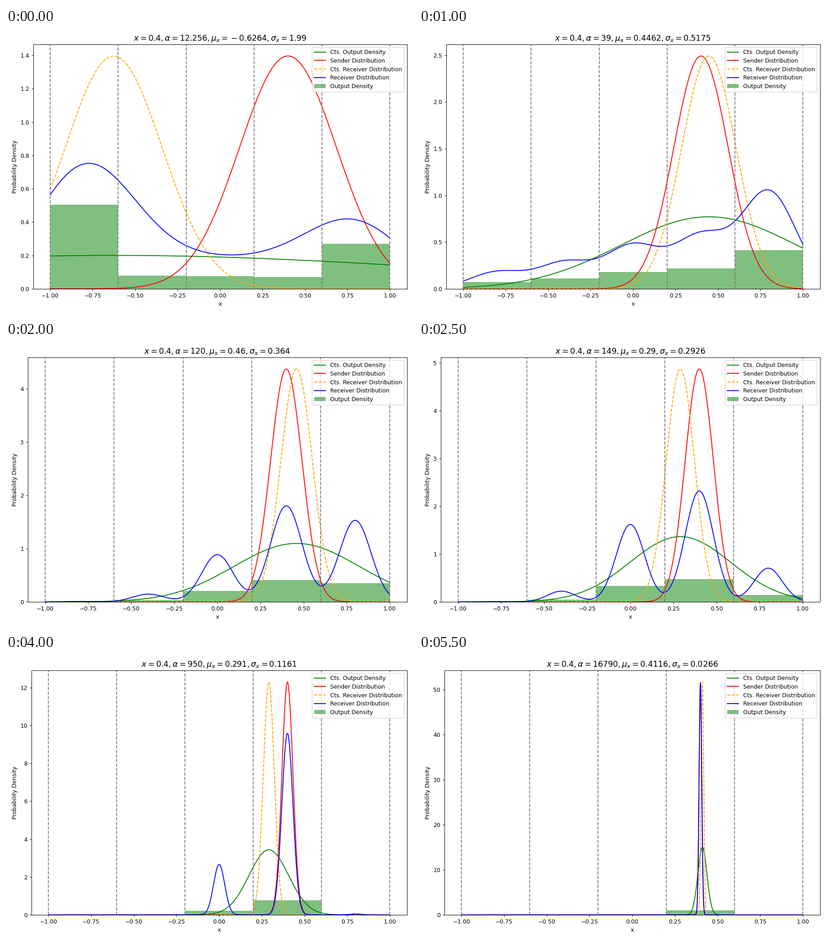
Recreate the animation shown at these times as a matplotlib script. Size 894 by 626 pixels, loop 6 s.

```python
import math

import matplotlib.pyplot as plt
import numpy as np
from matplotlib.animation import FuncAnimation

DPI = 89.4
FRAMES = 12
X_TRUE = 0.4
WIDEST, SHRINK = 1.99, 0.6
EDGES = np.linspace(-1, 1, 6)
CENTERS = (EDGES[:-1] + EDGES[1:]) / 2
XS = np.linspace(-1, 1, 1000)

# key points of the schedule, interpolated in between
KEYS = [0, 1, 3, 4, 5, 7, 9, 11]
ALPHAS = [12.256, 20, 77, 120, 149, 424, 2127, 16790]
MEANS = [-0.6264, 0.0025, 0.89, 0.46, 0.29, 0.2742, 0.3077, 0.4116]
STDS = [WIDEST, 0.5925, 0.452, 0.364, 0.2926, 0.1853, 0.0727, 0.0266]


def geometric(index, values):
    return math.exp(np.interp(index, KEYS, np.log(values)))


def schedule(index):
    alpha = geometric(index, ALPHAS)
    mean = np.interp(index, KEYS, MEANS)
    std = geometric(index, STDS)
    return round(alpha, 3 if alpha < 20 else 0), round(mean, 4), round(std, 4)


def normal_pdf(x, mean, std):
    return np.exp(-0.5 * ((x - mean) / std) ** 2) / (std * math.sqrt(2 * math.pi))


def normal_cdf(x, mean, std):
    return 0.5 * (1 + math.erf((x - mean) / (std * math.sqrt(2))))


def bin_masses(mean, std):
    """Probability per bin, with both tails folded into the outer bins."""
    inner = [normal_cdf(edge, mean, std) for edge in EDGES[1:-1]]
    return np.diff([0, *inner, 1])


def make_title(alpha, mean, std):
    # The braces keep operator spacing around a leading minus sign.
    return rf"$x=0.4,\alpha={alpha:g},\mu_x{{=}}{mean:g},\sigma_x={std:g}$"


fig = plt.figure(figsize=(10.00001, 7.00224), dpi=DPI, facecolor="white")


def draw(index):
    alpha, mean, std = schedule(index)
    noise = 1 / math.sqrt(alpha)
    # The bins start broad and never get narrower than the shrinking floor.
    masses = bin_masses(mean, max(std, WIDEST * SHRINK**index))
    receiver = sum(p * normal_pdf(XS, c, noise) for p, c in zip(masses, CENTERS))

    fig.clear()
    ax = fig.add_subplot()
    ax.bar(CENTERS, masses, width=0.4, color="green", alpha=0.5,
           label="Output Density")
    ax.plot(XS, normal_pdf(XS, mean, std), color="green",
            label="Cts. Output Density")
    ax.plot(XS, normal_pdf(XS, X_TRUE, noise), color="red",
            label="Sender Distribution")
    ax.plot(XS, normal_pdf(XS, mean, noise), color="orange", linestyle="--",
            label="Cts. Receiver Distribution")
    ax.plot(XS, receiver, color="blue", label="Receiver Distribution")
    for edge in EDGES:
        ax.axvline(edge, color="gray", linestyle="--")

    ax.set_xlim(-1.1, 1.1)
    ax.set_ylim(0, 1.05 * normal_pdf(0, 0, noise))
    ax.set_xlabel("x")
    ax.set_ylabel("Probability Density")
    ax.set_title(make_title(alpha, mean, std), fontsize=14)
    ax.legend(loc="upper left" if mean > 0.8 else "upper right",
              labelspacing=0.465)
    fig.tight_layout()
    return []


anim = FuncAnimation(fig, draw, frames=FRAMES, interval=500,
                     init_func=lambda: [], repeat=True, repeat_delay=0)
plt.show()
```
